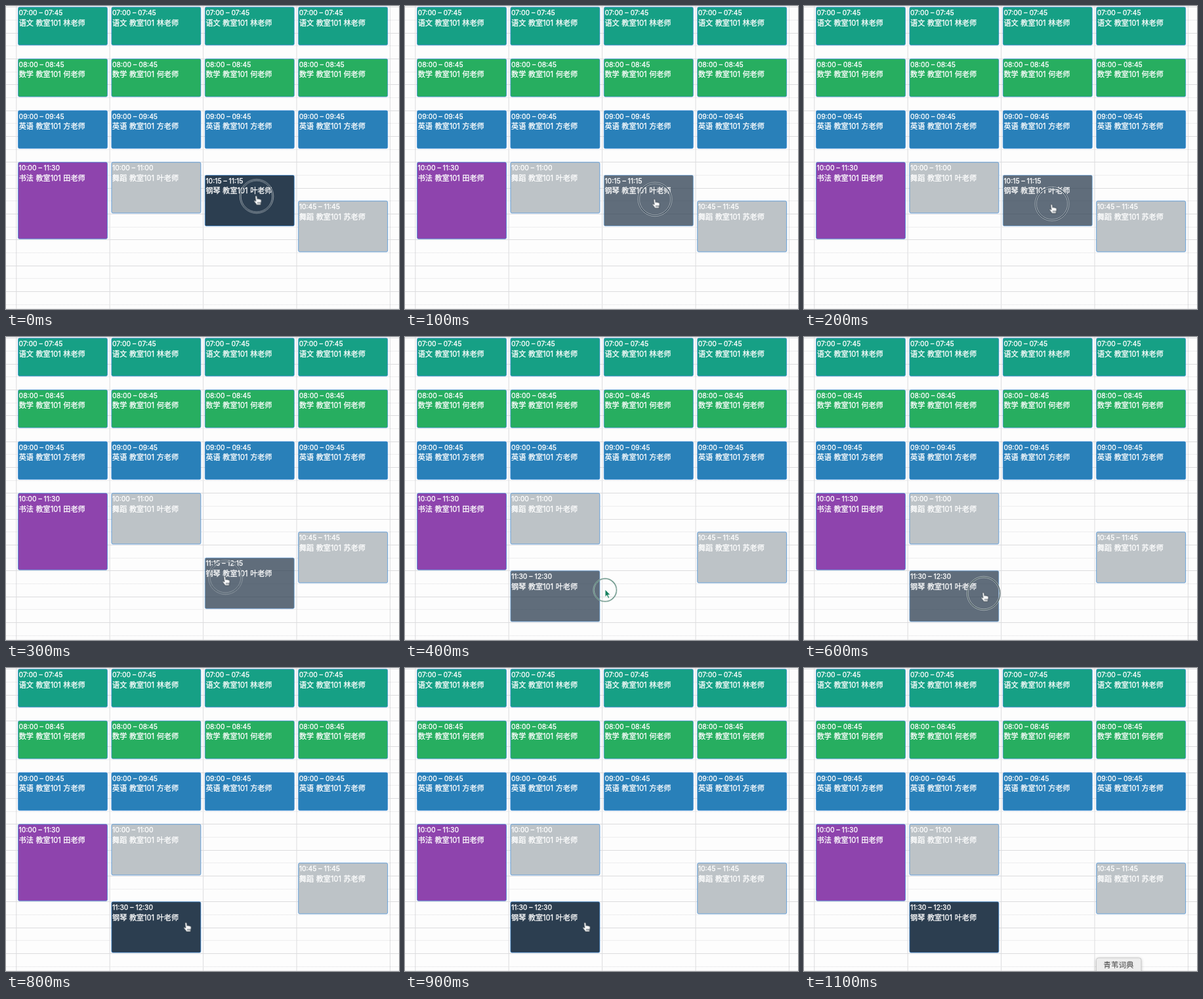
Animation, 599 px wide and 461 px high, one loop 1.2 s. Source, as an HTML page:

```html
<!DOCTYPE html>
<html lang="zh-CN">
<head>
<meta charset="utf-8">
<title>课程表</title>
<style>
  html, body { margin: 0; width: 100%; height: 100%; overflow: hidden; background: #fdfdfd; }
  svg { display: block; width: 599px; height: 461px; }
  text { font-family: Inter, "Noto Sans CJK SC", "Noto Sans CJK", sans-serif; fill: #fff; }
  .card text { stroke: #fff; stroke-width: .3px; }
  .time { font-size: 10.4px; }
  .title { font-size: 11.1px; word-spacing: .5px; }
  .line { stroke: #dcdcde; }
  .dotted { stroke: #dedee0; stroke-dasharray: 1 1; }
  .card rect { stroke: #3788d8; stroke-width: .7px; }

  .start, .over, .drop, .ring, .hand, .arrow, .tip { animation: 1200ms step-end infinite; }
  .start { animation-name: start; }
  .over { animation-name: over; }
  .drop { animation-name: drop; }
  .ring { animation-name: ring; fill: none; }
  .ring circle { vector-effect: non-scaling-stroke; }
  .edge { stroke: #e6e9ea; stroke-width: .7px; stroke-opacity: .8; }
  .hand { animation-name: hand; }
  .arrow { animation-name: arrow; }
  .tip { animation-name: tip; }
  .tip text { font-size: 11.6px; fill: #454545; }
  .tip rect { fill: #ededed; stroke: #c9c9c9; filter: drop-shadow(0 1px 2px #0003); }

  @keyframes start { 0% { opacity: 1 } 8.33% { opacity: .75 } 25%, 100% { opacity: 0 } }
  @keyframes over { 0% { opacity: 0 } 25% { opacity: .75 } 33.33%, 100% { opacity: 0 } }
  @keyframes drop { 0% { opacity: 0 } 33.33% { opacity: .75 } 66.66%, 100% { opacity: 1 } }
  @keyframes ring {
    0% { transform: translate(382px, 289.5px); stroke: #2c3e50; opacity: 1 }
    8.33% { transform: translate(381px, 294px) }
    16.66% { transform: translate(378px, 301px) }
    25% { transform: translate(334.5px, 365.5px) }
    33.33% { transform: translate(305px, 385px) scale(.7); stroke: #2b6b57 }
    41.66% { transform: translate(284px, 388px) scale(.95); stroke: #3f5358 }
    50% { transform: translate(274px, 390px); stroke: #3f5358; opacity: 1 }
    58.33% { transform: translate(275px, 390px); stroke: #3f5358; opacity: .5 }
    66.66%, 100% { transform: translate(275px, 390px); opacity: 0 }
  }
  @keyframes hand {
    0% { transform: translate(384px, 296px); opacity: 1 }
    8.33% { transform: translate(383px, 301px) }
    16.66% { transform: translate(380px, 309px) }
    25% { transform: translate(336px, 371.5px); opacity: 1 }
    33.33% { transform: translate(308px, 391px); opacity: 0 }
    41.66% { transform: translate(286px, 394px); opacity: 1 }
    50% { transform: translate(276px, 396px) }
    58.33% { transform: translate(277px, 395px) }
    66.66% { transform: translate(277px, 394.5px); opacity: 1 }
    83.33%, 100% { transform: translate(277px, 394.5px); opacity: 0 }
  }
  @keyframes arrow {
    0% { transform: translate(305px, 384px); opacity: 0 }
    33.33% { transform: translate(305px, 384px); opacity: 1 }
    41.66% { transform: translate(378px, 436px); opacity: 0 }
    83.33% { transform: translate(378px, 436px); opacity: 1 }
    91.66%, 100% { transform: translate(479px, 475px); opacity: 0 }
  }
  @keyframes tip { 0% { opacity: 0 } 91.66%, 100% { opacity: 1 } }
</style>
</head>
<body>
<svg viewBox="0 0 599 461">
  <g id="grid"></g>
  <g id="cards"></g>
  <g class="ring">
    <circle r="24.8" stroke-width="1.5"/>
    <circle class="edge" r="25.8"/>
    <circle class="edge" r="23.8"/>
  </g>
  <g class="hand" stroke="#26323c" stroke-width=".7" stroke-linejoin="round">
    <g transform="scale(1.1)">
      <path fill="#fff" d="M-3.8-5.4c0-1.6 2.2-1.6 2.5 0l.5 3.4c.5-.9 1.8-.7 2 .2 .6-.7 1.7-.4 1.8.4 .7-.4 1.6 0 1.7.9 .2 1.7-.1 2.8-.7 4.2v2.3h-6.1c-.4-1.8-1.8-2.7-3-4.5 -.9-1.4.6-2.2 1.5-1.2l.7.8z"/>
      <path fill="none" d="M-.3 2v2.5M1.4 2v2.5M3 2v2.5"/>
    </g>
  </g>
  <path class="arrow" d="M0 0v11.5l2.6-2.4 2 4.5 2-.9-2-4.3h3.5z" fill="#17815f" stroke="#fff" stroke-width=".9"/>
  <g class="tip">
    <rect x="445.5" y="441" width="68.5" height="24" rx="3.5"/>
    <text x="479.5" y="456" text-anchor="middle">青苇词典</text>
  </g>
</svg>
<script>
  const TOP = 1.8, HOUR = 78.65, COL = 142.4;
  const colors = {
    语文: '#16a085', 数学: '#27ae60', 英语: '#2980b9',
    书法: '#8e44ad', 舞蹈: '#bdc3c7', 钢琴: '#2c3e50'
  };
  const pad = n => String(n).padStart(2, '0');
  const clock = h => `${pad(Math.floor(h))}:${pad(Math.round(h % 1 * 60))}`;
  const yAt = h => TOP + (h - 7) * HOUR;

  function card(col, from, hours, subject, teacher, cls = '') {
    const x = 18.5 + col * COL, y = yAt(from);
    return `<g class="card ${cls}">
      <rect x="${x}" y="${y}" width="136" height="${hours * HOUR - 1.4}" rx="2" fill="${colors[subject]}"/>
      <text class="time" x="${x + 1.1}" y="${y + 12.4}">${clock(from)} – ${clock(from + hours)}</text>
      <text class="title" x="${x + 1.2}" y="${y + 28}">${subject} 教室101 ${teacher}老师</text>
    </g>`;
  }

  let grid = '<path class="line" d="M0 460.5H599" opacity=".5"/>';
  for (let i = 0; i < 24; i++) {
    const y = Math.floor(yAt(7 + i / 4)) + .5;
    grid += `<path class="${i % 2 ? 'dotted' : 'line'}" d="M0 ${y}H599"/>`;
  }
  for (let i = 0; i < 5; i++) grid += `<path class="line" d="M${15.8 + i * COL} 0V461"/>`;
  document.getElementById('grid').innerHTML = grid;

  let cards = '';
  for (let col = 0; col < 4; col++) {
    cards += card(col, 7, .75, '语文', '林') + card(col, 8, .75, '数学', '何') + card(col, 9, .75, '英语', '方');
  }
  cards += card(0, 10, 1.5, '书法', '田')
    + card(1, 10, 1, '舞蹈', '叶')
    + card(3, 10.75, 1, '舞蹈', '苏')
    + card(2, 10.25, 1, '钢琴', '叶', 'start')
    + card(2, 11.25, 1, '钢琴', '叶', 'over')
    + card(1, 11.5, 1, '钢琴', '叶', 'drop');
  document.getElementById('cards').innerHTML = cards;
</script>
</body>
</html>
```
